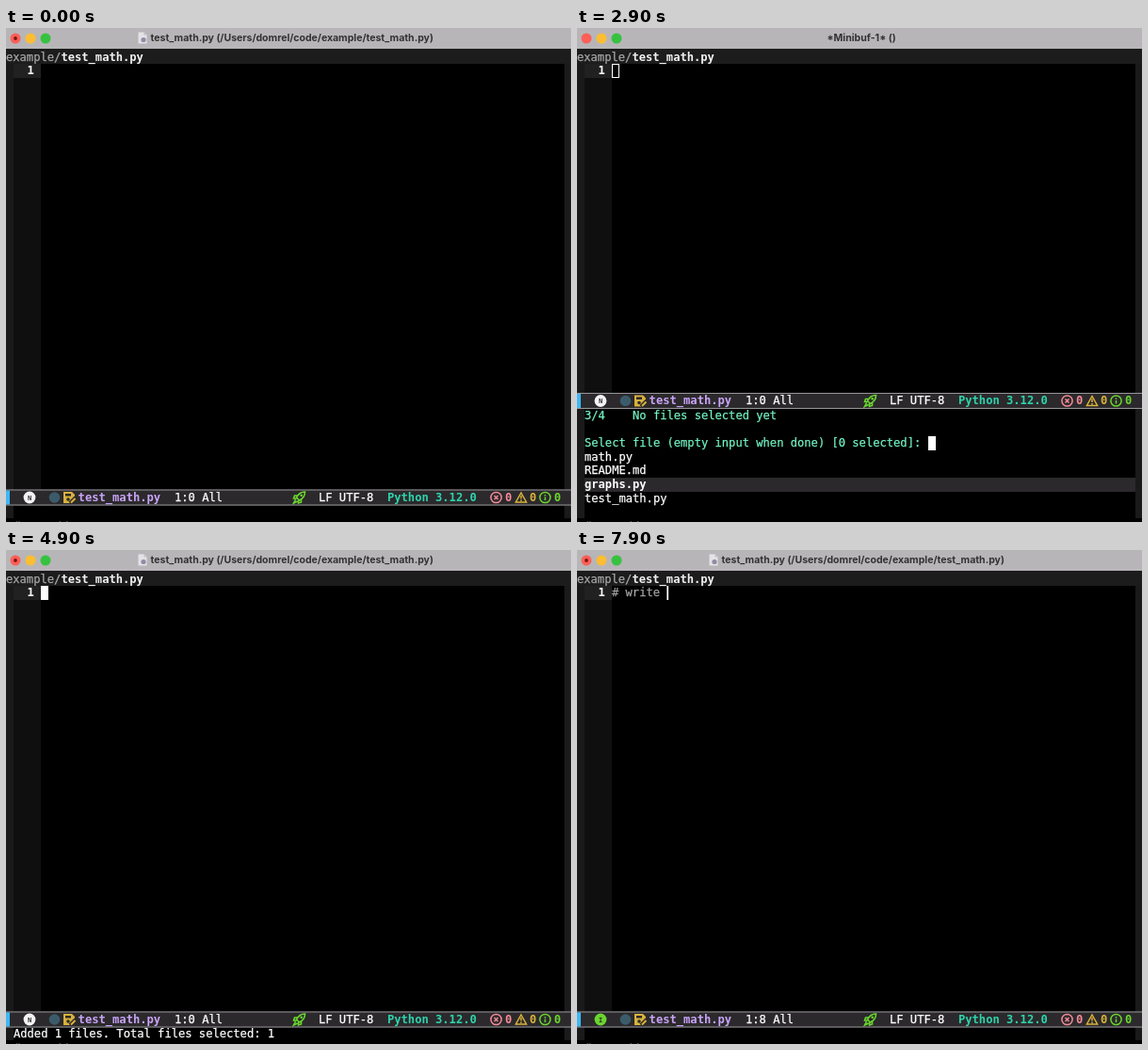
These frames come from a looping animation (600 by 524 pixels, 8 s). An HTML page with a canvas:

```html
<!DOCTYPE html>
<html lang="en">
<head>
<meta charset="utf-8">
<title>Editor</title>
<style>
html, body { margin: 0; width: 100%; height: 100%; overflow: hidden; background: #000; }
canvas { display: block; }
</style>
</head>
<body>
<canvas id="c" width="600" height="524"></canvas>
<script>
const ctx = document.getElementById('c').getContext('2d');
const LOOP = 8000, CH = 7.3, ROW = 14.6;
const MONO = '12.125px "DejaVu Sans Mono", monospace';
const GREEN = '#6ad62f', PROMPT = '#72f2c0', YELLOW = '#d9b23c', PINK = '#f48a98';
const FILES = ['math.py', 'README.md', 'graphs.py', 'test_math.py'];

const OPEN = 1100, PICK = 4200, CLOSE = 4800, INSERT = 6300, TYPE = 7000;
const MOVES = [[2600, 1], [2800, 2], [3000, 1], [3200, 0]];

function box(x, y, w, h, color) {
  ctx.fillStyle = color;
  ctx.fillRect(x, y, w, h);
}

// A hairline stroke gives the slightly heavy look of smoothed type.
function text(s, x, y, color = '#fff', bold = false) {
  ctx.font = (bold ? 'bold ' : '') + MONO;
  ctx.fillStyle = ctx.strokeStyle = color;
  ctx.fillText(s, x, y);
  if (bold) return;
  ctx.lineWidth = 0.25;
  ctx.strokeText(s, x, y);
}

function disc(x, y, r, color) {
  ctx.fillStyle = color;
  ctx.beginPath();
  ctx.arc(x, y, r, 0, 7);
  ctx.fill();
}

function shape(d, color, fill, width = 1.5) {
  const p = new Path2D(d);
  ctx.lineWidth = width;
  ctx.fillStyle = ctx.strokeStyle = color;
  fill ? ctx.fill(p) : ctx.stroke(p);
}

// Icons are drawn around their own centre.
function at(x, y, draw) {
  ctx.save();
  ctx.translate(x, y);
  draw();
  ctx.restore();
}

// On for half a second after the last key, then off and on by turns.
const blink = idle => Math.floor(idle / 500) % 2 === 0;

function titleBar(editing) {
  box(0, 0, 600, 22, '#b7b5b7');
  disc(10, 11, 5.5, '#fc5f57');
  disc(26, 11, 5.5, '#fbbd32');
  disc(42, 11, 5.5, '#36c240');
  ctx.font = '700 10.5px Inter, sans-serif';
  ctx.fillStyle = '#333133';
  if (!editing) {
    ctx.fillText('*Minibuf-1* ()', 265.5, 14);
    return;
  }
  ctx.fillText('test_math.py (/Users/domrel/code/example/test_math.py)', 153.5, 14);
  disc(10, 11, 1.9, '#7a1512');
  at(144.5, 10.5, () => {
    shape('M-4-6H2L5-3V6H-4Z', '#e4e2e6', true);
    shape('M2-6V-3H5Z', '#c2c0c6', true);
    disc(1.5, 2, 2.6, '#8f8ca4');
  });
}

function modeLine(y, col, insert) {
  const base = y + 12.2, mid = y + 8.5;
  box(0, y, 600, 17, '#2b292b');
  box(0, y, 600, 1, '#98969a');
  box(0, y + 16, 600, 1, '#98969a');
  box(0, y + 1, 4, 15, '#3fb6f5');

  disc(25, mid, 6.4, insert ? GREEN : '#f4f4f4');
  ctx.font = 'bold 7px "DejaVu Sans Mono", monospace';
  ctx.fillStyle = '#2b292b';
  ctx.fillText(insert ? 'I' : 'N', 22.9, mid + 2.6);
  disc(51.5, mid, 5.8, '#3b5b6b');

  at(67, mid, () => {
    shape('M-6-6H3L6-3V0L1 6H-6Z', YELLOW, true);
    box(-4, -4, 6, 2.5, '#2b292b');
    disc(-1, 2, 1.8, '#2b292b');
    shape('M1 6L7 0', '#2b292b', false, 4);
    shape('M2 5.5L6.5 1', YELLOW, false, 2);
  });
  text('test_math.py', 76.6, base, '#c9a4f8', true);
  text('1:' + col + ' All', 179, base);

  at(311.5, mid, () => {
    shape('M6-6C2-6-1-4-3 0L0 3C4 1 6-2 6-6ZM-2-2H-5L-6 1H-3M2 2V5L-1 6V3M-4 2L-6 6L-2 4', GREEN, false, 1.6);
    disc(2.2, -2.2, 1.3, GREEN);
  });
  text('LF UTF-8', 332, base);
  text('Python 3.12.0', 405, base, '#2fd3ad', true);

  at(520.5, mid, () => {
    shape('M5.6 0A5.6 5.6 0 1 1-5.6 0A5.6 5.6 0 1 1 5.6 0M-2-2L2 2M2-2L-2 2', PINK);
  });
  text('0', 530, base, PINK, true);
  at(547, mid, () => {
    shape('M0-5L5.6 5H-5.6ZM0-2V1.5M0 2.6V4', YELLOW);
  });
  text('0', 556, base, YELLOW, true);
  at(572.5, mid, () => {
    shape('M5.6 0A5.6 5.6 0 1 1-5.6 0A5.6 5.6 0 1 1 5.6 0M0-3V-1.5M0-.5V3', GREEN);
  });
  text('0', 582, base, GREEN, true);
}

function editor(bottom) {
  box(0, 22, 600, 16, '#1d1c1d');
  text('example/', 0, 35, '#a8a8a8');
  text('test_math.py', 8 * CH, 35, '#f2f2f2', true);
  box(0, 38, 8, 482, '#1b1a1b');
  box(593, 38, 7, 482, '#1b1a1b');
  box(8, 38, 29, bottom - 38, '#0f0f0f');
  box(8, 38, 29, 15, '#222122');
  text('1', 22.6, 49.4, '#fff', true);
}

function picker(t) {
  const picked = t >= PICK ? 1 : 0;
  const files = FILES.slice(picked);
  let sel = 0;
  if (!picked) for (const [time, row] of MOVES) if (t >= time) sel = row;

  const line = row => 415 + row * ROW;
  const info = picked ? 'Currently selected:' : 'No files selected yet';
  text(`${sel + 1}/${files.length}    ${info}`, 8, line(0), PROMPT);
  if (picked) text('  - math.py', 8, line(1), PROMPT);
  const ask = 2 + picked;
  text(`Select file (empty input when done) [${picked} selected]: `, 8, line(ask), PROMPT);

  const lastKey = picked ? PICK : t >= 3200 ? 3200 : t >= 2600 ? t : 1200;
  if (t < 1200 || blink(t - lastKey)) box(373, Math.round(line(ask) - 11.3), 8, 15, '#fff');

  files.forEach((name, i) => {
    const y = line(ask + 1 + i);
    if (i === sel) box(8, Math.round(y - 11.3), 585, 15, '#2b292b');
    text(name, 8, y, '#fff', i === sel);
  });
}

function draw(t) {
  const asking = t >= OPEN && t < CLOSE;
  const insert = t >= INSERT;
  const typed = t < TYPE ? 0 : t < 7300 ? 1 : Math.min(8, 2 + Math.floor((t - 7300) / 100));
  const bar = asking ? 387 : 489.5;

  box(0, 0, 600, 524, '#000');
  titleBar(!asking);
  editor(bar);
  modeLine(bar, typed, insert);
  text('# --- //', 8, 531.5, '#555');

  if (asking) {
    ctx.strokeStyle = '#fff';
    ctx.lineWidth = 1;
    ctx.strokeRect(37.5, 38.5, 7, 14);
    picker(t);
    return;
  }

  text('# write '.slice(0, typed), 37, 49.4, '#a3a3a3');
  const on = t < CLOSE ? t >= 100 && t < 600
    : blink(t - (typed ? t : insert ? INSERT : CLOSE));
  if (on) box(37 + typed * CH, 38, insert ? 1.7 : 8, 15, '#fff');

  if (insert && !typed) text('-- INSERT --', 8, 517);
  else if (t >= CLOSE && !insert) text('Added 1 files. Total files selected: 1', 8, 517);
}

function frame(now) {
  draw(now % LOOP);
  requestAnimationFrame(frame);
}
requestAnimationFrame(frame);
</script>
</body>
</html>
```
